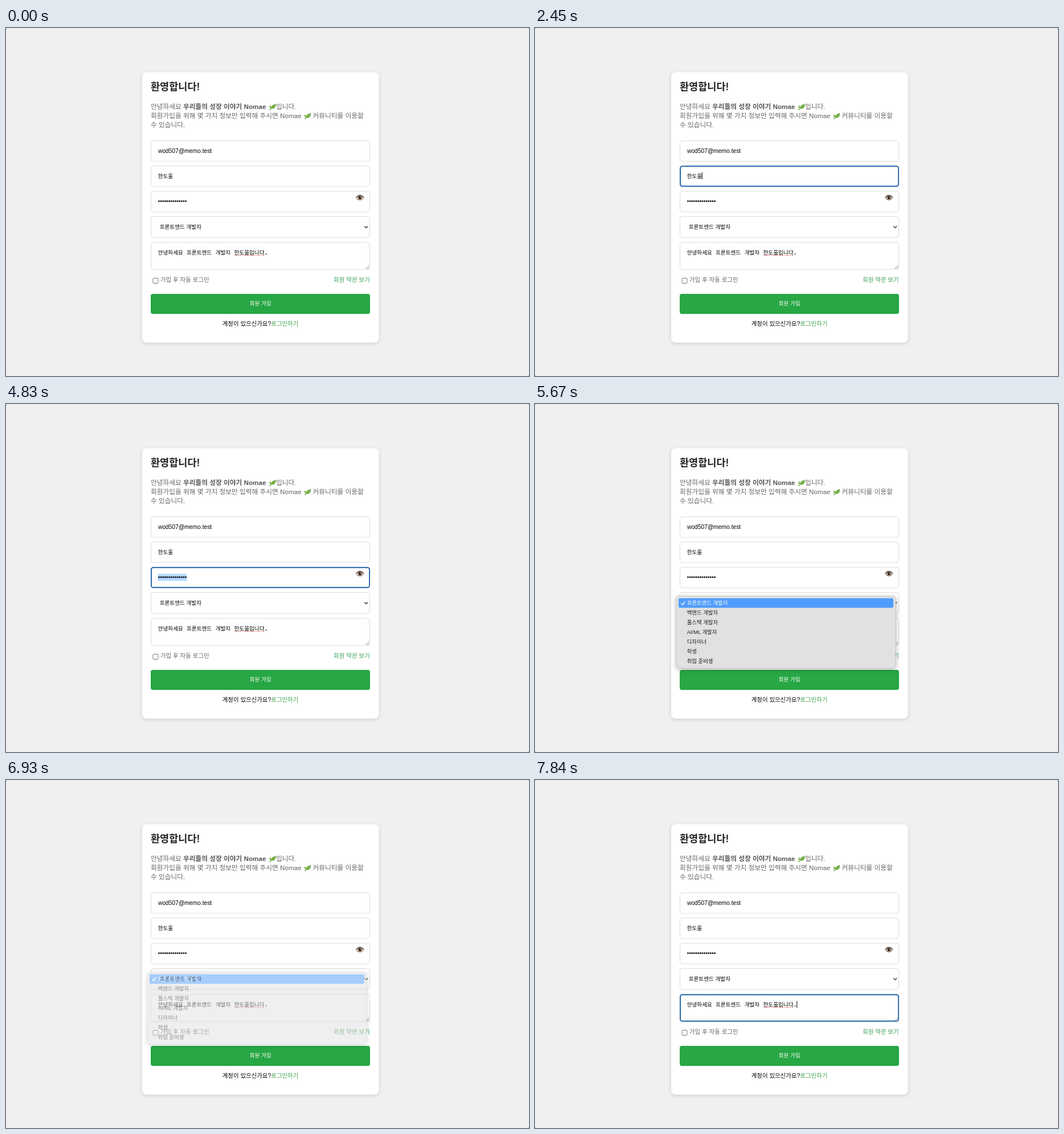
An HTML page for the animation above (8000 ms loop, 918 by 610 pixels).

```html
<!DOCTYPE html>
<html lang="ko">
<head>
<meta charset="utf-8">
<title>회원 가입</title>
<style>
  html, body { margin: 0; width: 100%; height: 100%; overflow: hidden; background: #f0f0f0; }
  svg { display: block; width: 918px; height: 610px; }
  text { font: 9.6px "Liberation Sans", "Noto Sans CJK KR", "Noto Sans CJK", sans-serif; white-space: pre; }
  .title { font-size: 17.5px; font-weight: bold; fill: #222; }
  .intro text { font-size: 11.7px; fill: #666; }
  .intro .bold { font-weight: bold; fill: #555; }
  .mail { font-size: 10.25px; }
  .note { font-size: 10.45px; }
  .mono { font: bold 10.25px "Liberation Mono", monospace; }
  .gray { fill: #666; }
  .link { fill: #3a9f52; }
  .field { fill: #fff; stroke: #dcdcdc; }
  .card { fill: #fff; filter: drop-shadow(0 2px 3px rgba(0, 0, 0, .13)); }
  .panel { fill: #e1e1e1; stroke: #bdbdbd; stroke-width: .7; filter: drop-shadow(0 2px 4px rgba(0, 0, 0, .28)); }
</style>
</head>
<body>
<svg viewBox="0 0 918 610">
  <defs>
    <g id="leaf">
      <path d="M0.5 10.5Q2.5 10 4 7" fill="none" stroke="#5b8d32" stroke-width="1.2"/>
      <path d="M3.4 8.2C2.6 3.2 7 1.8 11.6 0C12 5 9.6 9.6 3.4 8.2Z" fill="#69a83c"/>
      <path d="M3.2 8C-.2 7.5-.2 4.4 1 2.6C3.6 4 4.2 5.8 3.2 8Z" fill="#80b94c"/>
      <path d="M4 7.5Q7 5.5 9.5 2.5" fill="none" stroke="#a6d374" stroke-width=".7"/>
    </g>
  </defs>

  <rect width="918" height="610" fill="#888"/>
  <rect width="918" height="610" rx="2" fill="#f0f0f0"/>
  <rect class="card" x="239" y="77.5" width="415.5" height="474" rx="8"/>
  <text class="title" x="254" y="109">환영합니다!</text>

  <g class="intro">
    <text x="254" y="142.3">안녕하세요</text>
    <text class="bold" x="311" y="142.3">우리들의 성장 이야기 Nomae</text>
    <use href="#leaf" x="462" y="133"/>
    <text x="474" y="142.3">입니다.</text>
    <text x="254" y="158.4">회원가입을 위해 몇 가지 정보만 입력해 주시면 Nomae</text>
    <use href="#leaf" x="523.5" y="149"/>
    <text x="538.5" y="158.4">커뮤니티를 이용할</text>
    <text x="254" y="173.8">수 있습니다.</text>
  </g>

  <g id="fields"></g>
  <rect id="focus" x="255" width="383" rx="3.5" fill="none" stroke="#0c54a4" stroke-width="1.7"/>
  <rect id="selection" fill="#b3d7ff"/>

  <text class="mail" x="267" y="219">wod507@memo.test</text>
  <text x="266.7" y="262.5">한도울</text>
  <g id="dots"></g>

  <g id="eye">
    <ellipse cx="621.3" cy="297.3" rx="6" ry="4.1" fill="#f1ebe6" stroke="#5c4c43" stroke-width="1"/>
    <path d="M615.2 297Q621.3 289.8 627.4 297" fill="none" stroke="#4a3c35" stroke-width="1.3"/>
    <circle cx="621.3" cy="297.2" r="3.2" fill="#6a4330"/>
    <circle cx="621.3" cy="297.2" r="1.7" fill="#1d1715"/>
    <circle cx="622.3" cy="296" r=".7" fill="#fff"/>
  </g>

  <text x="269.7" y="352.4">프론트엔드 개발자</text>
  <path d="M629.2 347.4l3 3 3-3" fill="none" stroke="#222" stroke-width="1.3"/>

  <text x="266.7" y="397">안녕하세요</text>
  <text x="317" y="397">프론트엔드</text>
  <text x="367.7" y="397">개발자</text>
  <text x="400.5" y="397">한도울입니다</text>
  <text class="mono" x="453.5" y="397">.</text>
  <path d="M401 398.7H454" stroke="#e8433f" stroke-width="1.1" stroke-dasharray="1.2 1.1"/>
  <path d="M631.5 422.5l6-6M635 422.5l2.5-2.5" stroke="#777" stroke-width=".9"/>

  <rect x="258" y="438.5" width="9" height="9" rx="1.8" fill="#fff" stroke="#767676"/>
  <text class="note gray" x="271" y="445.2">가입 후 자동 로그인</text>
  <text class="note link" x="638.5" y="445.2" text-anchor="end">회원 약관 보기</text>
  <rect x="254" y="466" width="385" height="35.3" rx="4" fill="#28a745"/>
  <text x="446.5" y="486.4" text-anchor="middle" fill="#fff">회원 가입</text>
  <text class="note" x="379.7" y="521.8">계정이 있으신가요?</text>
  <text class="note link" x="465.3" y="521.8">로그인하기</text>

  <rect id="caret" width="1" height="12"/>

  <g id="menu">
    <rect class="panel" x="248.3" y="337" width="384.7" height="126" rx="4.5"/>
    <rect id="hover" x="252" width="377" height="16.8" rx="3" fill="#509cfb"/>
    <path id="check" d="M256.8 349.4l2.3 2.7 4-6" fill="none" stroke-width="1.4"/>
  </g>
</svg>

<script>
const LOOP = 8000;
const ROW = 16.87;
const DOT_STEP = 3.62;
const $ = id => document.getElementById(id);

function add(parent, tag, attrs, text = "") {
  const node = document.createElementNS("http://www.w3.org/2000/svg", tag);
  set(node, attrs);
  node.textContent = text;
  return parent.appendChild(node);
}
function set(node, attrs) {
  for (const key in attrs) node.setAttribute(key, attrs[key]);
}
function show(node, visible) {
  node.style.display = visible ? "" : "none";
}

// Top and height of each input box
const fields = {
  email: [197.7, 36], name: [241.8, 36], password: [286.2, 36],
  job: [330.5, 36.5], about: [375.8, 47.4]
};
for (const [y, height] of Object.values(fields))
  add($("fields"), "rect", { class: "field", x: 254.5, y, width: 384, height, rx: 3.5 });

for (let i = 0; i < 14; i++)
  add($("dots"), "circle", { cx: 268.5 + i * DOT_STEP, cy: 303.6, r: 1.45 });

const jobs = ["프론트엔드", "백엔드", "풀스택", "AI/ML"].map(s => s + " 개발자")
  .concat("디자이너", "학생", "취업 준비생");
const items = jobs.map((job, i) =>
  add($("menu"), "text", { x: 266.7, y: 352.4 + i * ROW, style: "font-size:9.4px" }, job));

// Last entry whose start time has passed
const at = (t, steps) => steps.reduce((value, [start, next]) => t >= start ? next : value, null);

const focusSteps = [[0, null], [840, "about"], [1120, "email"], [2450, "name"],
  [4410, "password"], [5600, null], [7840, "about"]];
const caretSteps = [[840, [459.3, 387.5]], [1120, [302.3, 209.7]], [1680, null],
  [2450, [292.8, 253]], [3010, null], [4410, [317, 297.8]], [4480, null], [7840, [459.3, 387.5]]];
const hoverSteps = [[0, 0], [5950, 1], [6020, 2], [6160, 1], [6230, 0], [6650, -1], [6720, 0]];
const fadeSteps = [[0, 0], [5600, 1], [6790, .92], [6860, .75], [6930, .5], [7000, .25], [7070, .08], [7140, 0]];

// Selected span as [left, right, top]
function selectionAt(t) {
  if (t >= 1820 && t < 2450) return [266.5, t < 1960 ? 302.5 : 361, 209.8];
  if (t >= 3150 && t < 4410) {
    const letters = Math.min(3, 1 + Math.floor((t - 3150) / 70));
    return [293.2 - letters * 8.85, 293.2, 253];
  }
  if (t >= 4480 && t < 5600) {
    const part = Math.min(1, Math.floor((t - 4410) / 70) / 6);
    return [317.2 - Math.round(14 * part) * DOT_STEP, 317.2, 297.8];
  }
  return null;
}

function draw(t) {
  const focused = at(t, focusSteps);
  show($("focus"), focused);
  if (focused) {
    const [y, height] = fields[focused];
    set($("focus"), { y: y + .5, height: height - 1 });
  }

  const span = selectionAt(t);
  show($("selection"), span);
  if (span) set($("selection"), { x: span[0], y: span[2], width: span[1] - span[0], height: 12 });

  const caret = at(t, caretSteps);
  show($("caret"), caret);
  if (caret) set($("caret"), { x: caret[0], y: caret[1] });

  const opacity = at(t, fadeSteps);
  const hover = at(t, hoverSteps);
  show($("menu"), opacity);
  set($("menu"), { opacity });
  show($("hover"), hover >= 0);
  set($("hover"), { y: 340.4 + hover * ROW });
  set($("check"), { stroke: hover === 0 ? "#fff" : "#222" });
  items.forEach((item, i) => set(item, { fill: i === hover ? "#fff" : "#1c1c1c" }));
}

function tick() {
  draw(performance.now() % LOOP);
  requestAnimationFrame(tick);
}
tick();
</script>
</body>
</html>
```
